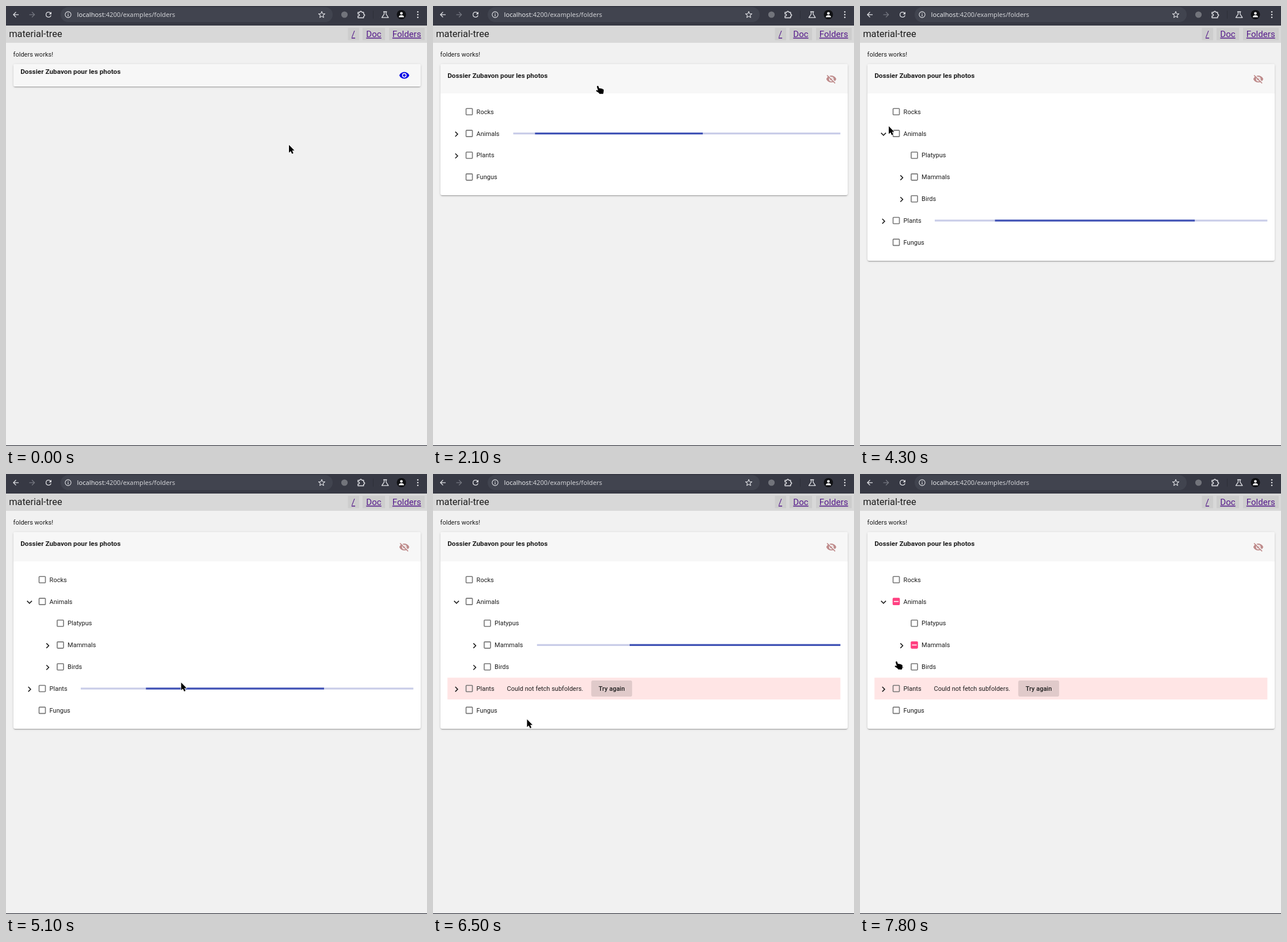
Write an HTML page that moves like this. It is 732x765 px and loops after 8000 ms.

```html
<!DOCTYPE html>
<html lang="en">
<head>
<meta charset="utf-8">
<title>material-tree</title>
<style>
  html, body { margin: 0; width: 100%; height: 100%; overflow: hidden; background: #f1f1f1; }
  #stage { position: relative; width: 732px; height: 765px; overflow: hidden; }
  svg { position: absolute; left: 0; top: 0; width: 732px; height: 765px; }
  text { font: 11.03px Roboto, sans-serif; fill: #1c1c1c; white-space: pre; }
  .brand { font-size: 16.4px; }
  .link { font-size: 15.1px; fill: #551a8b; text-decoration: underline; }
  .title { font-size: 11.81px; font-weight: 700; }
  .button { font-weight: 500; }
  .url { font: 11.17px "Noto Sans", sans-serif; fill: #d0d1d5; }
  #card {
    position: absolute; left: 12.6px; top: 101px; width: 708.6px;
    overflow: hidden; border-radius: 3px; background: #fff;
    box-shadow: 0 2.4px .8px -1.6px rgba(0,0,0,.2), 0 1.6px 1.6px rgba(0,0,0,.14), 0 .8px 4px rgba(0,0,0,.12);
  }
  #card svg { left: -12.6px; top: -101px; }
  .line { fill: none; stroke: #e2e3e7; stroke-width: 1.4; stroke-linejoin: round; }
</style>
</head>
<body>
<div id="stage">
  <div id="page">
    <svg id="head">
      <rect y="34" width="732" height="30" fill="#d8d8d8"/>
      <text class="brand" x="5.2" y="54.3">material-tree</text>
      <g fill="#cdcdcd">
        <rect x="594.5" y="38" width="19.5" height="21.5"/>
        <rect x="620" y="38" width="39" height="21.5"/>
        <rect x="666" y="38" width="62" height="21.5"/>
      </g>
      <text class="link" x="600.8" y="54">/</text>
      <text class="link" x="626.3" y="54">Doc</text>
      <text class="link" x="671.8" y="54">Folders</text>
      <text x="12.6" y="88.4">folders works!</text>
    </svg>
    <div id="card">
      <svg>
        <g id="rows"></g>
        <rect id="cap" x="12" y="101" width="710" fill="#f7f7f7"/>
        <text id="title" class="title" x="25.2">Dossier Zubavon pour les photos</text>
        <g id="eye">
          <path d="M12 4.5C7 4.5 2.73 7.61 1 12c1.73 4.39 6 7.5 11 7.5s9.27-3.11 11-7.5c-1.73-4.39-6-7.5-11-7.5zM12 17a5 5 0 1 1 0-10a5 5 0 0 1 0 10zm0-8a3 3 0 1 0 0 6a3 3 0 0 0 0-6z"/>
          <g id="slash" fill="none" stroke-width="2">
            <path d="M4 2.2L21.8 20" stroke="#f7f7f7"/>
            <path d="M2.6 3.6L20.4 21.4" stroke="#bf8c8c"/>
          </g>
        </g>
      </svg>
    </div>
  </div>

  <svg id="browser">
    <rect width="732" height="34" fill="#373944"/>
    <rect x="95" y="2" width="473" height="26" rx="13" fill="#41444f"/>
    <path id="back" fill="#e2e3e7" transform="translate(9.5 7.5) scale(.625)" d="M20 11H7.83l5.59-5.59L12 4l-8 8 8 8 1.41-1.41L7.83 13H20z"/>
    <path fill="#767881" transform="translate(53 7.5) scale(-.625 .625)" d="M20 11H7.83l5.59-5.59L12 4l-8 8 8 8 1.41-1.41L7.83 13H20z"/>
    <path id="reload" fill="#e2e3e7" transform="translate(66.5 7.5) scale(.625)" d="M17.65 6.35A8 8 0 0 0 12 4a8 8 0 1 0 7.73 10h-2.08A6 6 0 1 1 12 6c1.66 0 3.14.69 4.22 1.78L13 11h7V4z"/>
    <path id="stop" class="line" d="M70 11l8 8m0-8l-8 8"/>
    <circle class="line" cx="108" cy="15" r="5.1" style="stroke-width:1.1"/>
    <path class="line" d="M108 14.3v3.6M108 12v1.3" style="stroke-width:1.2"/>
    <text class="url" x="123.6" y="19"><tspan fill="#e8e9ec">localhost</tspan>:4200/examples/folders</text>
    <path id="star" class="line" style="stroke-width:1.1"/>
    <circle cx="588.5" cy="15" r="5.6" fill="#72747b"/>
    <path class="line" d="M612 11h3.2a1.8 1.8 0 1 1 3.6 0h3v3.2a1.8 1.8 0 1 1 0 3.6v2.7H612v-3.3a1.8 1.8 0 1 0 0-3.2z"/>
    <path d="M638.5 8v14" stroke="#2d2f38"/>
    <path class="line" d="M656 10h6.4M657.5 10v4.2l-4 6h11.4l-4-6V10" style="stroke-width:1.3"/>
    <circle cx="687.5" cy="15" r="8" fill="#101114"/>
    <circle cx="687.5" cy="12.8" r="2.3" fill="#fff"/>
    <path d="M682.9 19.4c0-4.6 9.2-4.6 9.2 0z" fill="#fff"/>
    <path d="M716 10.2h0m0 4.8h0m0 4.8h0" stroke="#e2e3e7" stroke-width="2.6" stroke-linecap="round"/>
    <rect y="763.8" width="732" height="1.2" fill="#33353d"/>
  </svg>

  <svg>
    <g id="cursor" stroke="#fff" stroke-linejoin="round" paint-order="stroke" stroke-width="1.6">
      <path id="arrow" d="M.5.5V14l3.1-2.8 2.2 4.9 2.4-1.1L6 10.2h4z"/>
      <path id="hand" d="M2.2 1.4C3 .4 4.4.7 4.8 1.9L6 5.4C7.4 4.8 8.6 5 9 5.8 10.2 5.3 11.3 5.6 11.7 6.5 13 6.2 13.8 7 13.8 8.2L13.6 11.5C13.5 12.6 13 13.3 13 14.7H6.4C6 13.2 4.6 12.2 3 11.4 1.2 10.6.4 10 .6 9 1 8 2.4 8.2 4 8.8L2 2.8z"/>
    </g>
  </svg>
</div>

<script>
const LOOP = 8000, STEP = 100;
const ROW = 37.85, INDENT = 31.5, FIRST = 183.8, RIGHT = 708.3;
const $ = id => document.getElementById(id);
const set = (el, attrs) => { for (const k in attrs) el.setAttribute(k, attrs[k]); return el; };
const add = (parent, tag, attrs, label) => {
  const el = set(document.createElementNS('http://www.w3.org/2000/svg', tag), attrs);
  if (label) el.textContent = label;
  return parent.appendChild(el);
};
const show = (el, on) => { el.style.display = on ? '' : 'none'; };
const mix = (a, b, k) => a + (b - a) * k;

// Cubic Bezier easing, solved by bisection
function ease(x, [x1, y1, x2, y2]) {
  const at = (a, b, u) => 3 * (1 - u) * (1 - u) * u * a + 3 * (1 - u) * u * u * b + u * u * u;
  if (x <= 0 || x >= 1) return x <= 0 ? 0 : 1;
  let lo = 0, hi = 1;
  for (let i = 0; i < 24; i++) {
    const mid = (lo + hi) / 2;
    if (at(x1, x2, mid) < x) lo = mid; else hi = mid;
  }
  return at(y1, y2, lo);
}
// keys: [position, value, easing to the next key]
function follow(keys, p) {
  let i = 0;
  while (i < keys.length - 2 && p >= keys[i + 1][0]) i++;
  const [a, v, curve = [0, 0, 1, 1]] = keys[i], [b, w] = keys[i + 1];
  return mix(v, w, ease((p - a) / (b - a), curve));
}

// Material indeterminate bar: centre and width of two pieces, as shares of the track
const E1 = [.15, 0, .515058, .409685], E2 = [.31033, .284058, .8, .733712], E3 = [.4, .627035, .6, .902026];
const PIECES = [
  { from: -.951666,
    move: [[0, 0], [.2, 0, [.5, 0, .701732, .495819]], [.5915, .836714, [.302435, .381352, .55, .956352]], [1, 2.006111]],
    size: [[0, .08], [.3665, .08, [.334731, .12482, .785844, 1]], [.6915, .661479, [.06, .11, .6, 1]], [1, .08]] },
  { from: -.048889,
    move: [[0, 0, E1], [.25, .376519, E2], [.4835, .843862, E3], [1, 1.602778]],
    size: [[0, .08, E1], [.1915, .457104, E2], [.4415, .72796, E3], [1, .08]] }
];

const OPEN = 1860, LOADED = 3700, FAILED = 5700, PARTIAL = 7700;
const RIGHT_ARROW = 'M10 6L8.59 7.41 13.17 12l-4.58 4.59L10 18l6-6z';
const DOWN_ARROW = 'M16.59 8.59L12 13.17 7.41 8.59 6 10l6 6 6-6z';
const rows = [
  { name: 'Rocks' },
  { name: 'Animals', branch: true, opens: true, partial: true, bar: [139.5, 1605, 0, LOADED] },
  { name: 'Platypus', depth: 1 },
  { name: 'Mammals', depth: 1, branch: true, partial: true, bar: [149.3, 5655, FAILED, PARTIAL] },
  { name: 'Birds', depth: 1, branch: true },
  { name: 'Plants', branch: true, fails: true, bar: [130, 3634, LOADED, FAILED] },
  { name: 'Fungus' }
];

function build(row) {
  const g = row.g = add($('rows'), 'g', {});
  if (row.fails) {
    row.error = add(g, 'g', {});
    add(row.error, 'rect', { x: 25.2, y: -ROW / 2, width: RIGHT - 25.2, height: ROW, fill: '#ffe5e5' });
    add(row.error, 'text', { x: 128.6, y: 3.9 }, 'Could not fetch subfolders.');
    add(row.error, 'rect', { x: 275.2, y: -14, width: 71, height: 28, rx: 3, fill: '#e0caca' });
    add(row.error, 'text', { x: 288, y: 3.9, class: 'button' }, 'Try again');
  }
  if (row.branch) row.chevron = add(g, 'path', { transform: 'translate(31.4 -8.3) scale(.7875)', fill: '#1c1c1c' });
  row.box = add(g, 'rect', { x: 57.5, y: -5.5, width: 11, height: 11, rx: 1, 'stroke-width': 1.6 });
  row.dash = add(g, 'rect', { x: 58.9, y: -.8, width: 8.2, height: 1.6, fill: '#fff' });
  add(g, 'text', { x: 75.6, y: 3.9 }, row.name);
  if (row.bar) {
    row.end = RIGHT - (row.depth || 0) * INDENT;
    row.track = add(g, 'g', {});
    add(row.track, 'rect', { x: row.bar[0], y: -1.6, width: row.end - row.bar[0], height: 3.2, fill: '#c8cce8' });
    row.fills = PIECES.map(() => add(row.track, 'rect', { y: -1.6, height: 3.2, fill: '#3f51b5' }));
  }
}
rows.forEach(build);

let star = '';
for (let i = 0; i < 10; i++) {
  const r = i % 2 ? 2.6 : 5.8, a = i * Math.PI / 5;
  star += (i ? 'L' : 'M') + (549 + r * Math.sin(a)).toFixed(2) + ' ' + (15.3 - r * Math.cos(a)).toFixed(2);
}
set($('star'), { d: star + 'z' });

// Pointer: time / 100, x, y
const PATH = [
  [0, 491.5, 241], [1, 492.3, 243], [9, 492.3, 243], [10, 501, 235], [11, 515, 200],
  [12, 450, 148], [13, 340, 78], [14, 263, 92], [15, 290, 115.5], [17, 281, 118],
  [19, 281, 118], [21, 283, 138], [22, 262, 162], [24, 100, 222], [26, 33, 219],
  [27, 31, 215], [30, 31, 218], [37, 31, 218], [41, 37, 207], [45, 62, 210],
  [46, 82, 226], [51, 304, 362], [53, 300, 540], [54, 290, 610], [56, 285, 609],
  [61, 190, 470], [63, 163, 426], [66, 163, 426], [70, 91, 414], [72, 89, 400],
  [75, 39, 341], [77, 59, 326], [78, 60, 325], [80, 60, 325]
];
const HANDS = [[1500, 2200], [2600, 4000], [7600, LOOP]];

function drawRow(row, t, y) {
  const loaded = t >= LOADED, partial = row.partial && t >= PARTIAL;
  set(row.g, { transform: `translate(${(row.depth || 0) * INDENT} ${y})` });
  set(row.box, { fill: partial ? '#ff4081' : 'none', stroke: partial ? '#ff4081' : '#757575' });
  show(row.dash, partial);
  if (row.chevron) set(row.chevron, { d: row.opens && loaded ? DOWN_ARROW : RIGHT_ARROW });
  if (row.error) show(row.error, t >= FAILED);
  if (!row.bar) return;
  const [left, start, from, to] = row.bar, busy = t >= from && t < to;
  show(row.track, busy);
  if (!busy) return;
  const p = ((t - start + 4000) % 2000) / 2000, span = row.end - left;
  PIECES.forEach((piece, i) => {
    const mid = piece.from + follow(piece.move, p), half = follow(piece.size, p) / 2;
    const a = Math.min(1, Math.max(0, mid - half)), b = Math.min(1, Math.max(0, mid + half));
    set(row.fills[i], { x: left + a * span, width: (b - a) * span });
  });
}

function render(t) {
  // Page reload
  const reloading = t >= 500 && t < 800;
  show($('stop'), reloading);
  show($('reload'), !reloading);
  show($('page'), t < 600 || t >= 700);
  show($('eye'), t < 700 || t >= 800);

  // Panel
  const k = ease((t - OPEN) / 225, [.4, 0, .2, 1]), open = t >= OPEN;
  const cap = mix(38.5, 51, k), count = t >= LOADED ? 7 : 4;
  $('card').style.height = cap + k * (26 + count * ROW) + 'px';
  set($('cap'), { height: cap });
  set($('title'), { y: mix(118.2, 124.5, k) });
  set($('eye'), {
    transform: `translate(683.1 ${mix(111.1, 117.5, k)}) scale(.7875)`,
    fill: open ? '#bf8c8c' : '#0000e6'
  });
  show($('slash'), open);

  let y = FIRST + cap - 51;
  for (const row of rows) {
    const on = !row.depth || t >= LOADED;
    show(row.g, on);
    if (!on) continue;
    drawRow(row, t, y);
    y += ROW;
  }

  // Pointer
  const at = i => follow(PATH.map(p => [p[0], p[i]]), t / STEP);
  const hand = HANDS.some(([a, b]) => t >= a && t < b);
  set($('cursor'), { transform: `translate(${at(1)} ${at(2)})` });
  show($('hand'), hand);
  show($('arrow'), !hand);
}

function tick() {
  const t = performance.now() % LOOP;
  render(Math.floor(t / STEP) * STEP);
  requestAnimationFrame(tick);
}
tick();
</script>
</body>
</html>
```
